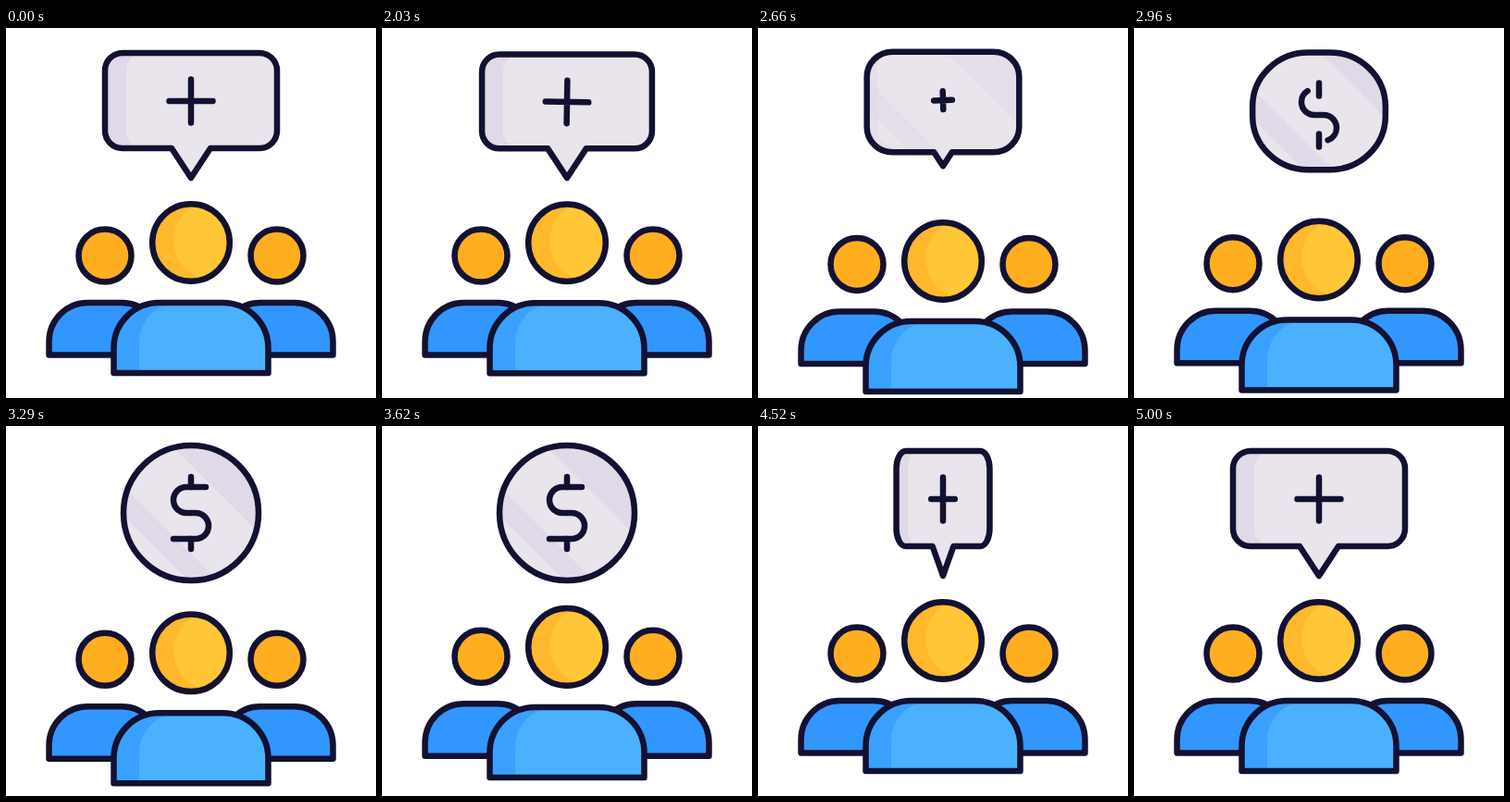
An HTML page that plays this animation: 400 by 400 pixels, repeating every 5.03 s.

```html
<!DOCTYPE html>
<html lang="en">
<head>
<meta charset="utf-8">
<title>Group funding</title>
<style>
  html, body { margin: 0; width: 100%; height: 100%; overflow: hidden; background: #fff; }
  svg { display: block; width: 100vw; height: 100vh; }
  .line { fill: none; stroke: #121131; stroke-width: 6.5; stroke-linecap: round; stroke-linejoin: round; vector-effect: non-scaling-stroke; }
</style>
</head>
<body>
<svg viewBox="0 0 400 400">
  <defs>
    <clipPath id="panelClip"><path id="panelMask"/></clipPath>
    <clipPath id="headClip"><circle cx="200" cy="232" r="42"/></clipPath>
    <path id="torso" d="M116.5 373V346a49 49 0 0 1 49-49H234.500a49 49 0 0 1 49 49V373Z"/>
    <clipPath id="torsoClip"><use href="#torso"/></clipPath>
    <g id="friend">
      <circle class="line" cx="107" cy="246" r="28.500" style="fill:#ffae20"/>
      <path class="line" d="M46.500 353.500V339a42 42 0 0 1 42-42H125a42 42 0 0 1 42 42V353.500Z" style="fill:#3296ff"/>
    </g>
  </defs>

  <g id="sides">
    <use href="#friend"/>
    <use href="#friend" transform="matrix(-1 0 0 1 400 0)"/>
  </g>

  <g id="leader">
    <g clip-path="url(#headClip)">
      <circle cx="200" cy="232" r="42" fill="#ffb82b"/>
      <circle cx="223" cy="230" r="42" fill="#ffc637"/>
    </g>
    <circle class="line" cx="200" cy="232" r="41.800"/>
    <g clip-path="url(#torsoClip)">
      <use href="#torso" fill="#3aa0ff"/>
      <path d="M144 373V340a43 43 0 0 1 43-43H290V373Z" fill="#4bb0fd"/>
    </g>
    <use href="#torso" class="line"/>
  </g>

  <g id="panel">
    <g clip-path="url(#panelClip)">
      <rect width="400" height="200" fill="#eae5ec"/>
      <g id="bubbleShade">
        <path d="M100 20H149V27a19 19 0 0 0-19 19V111a19 19 0 0 0 19 19V134H100Z" fill="#e0d9e7"/>
      </g>
      <g id="coinShade" fill="#e0d9e7">
        <path d="M30 0H62L262 200H230Z"/>
        <path id="glint" d="M155 0H400V245Z"/>
      </g>
    </g>
    <path id="outline" class="line"/>
    <path id="plus" class="line" d="M176.500 79H223.500M200 55.500V102.500"/>
    <g id="dollar">
      <path id="curve" class="line" pathLength="2" d="M216 66H195a14 14 0 0 0 0 28H205a14 14 0 0 1 0 28H181"/>
      <path id="bars" class="line"/>
    </g>
  </g>
</svg>
<script>
const LOOP = 5030, START = 2030, STEP = 30, SWAP = 4240;
const $ = id => document.getElementById(id);
const set = (id, name, value) => $(id).setAttribute(name, value);

// Eased value from alternating times and values
function track(t, ...keys) {
  if (t <= keys[0]) return keys[1];
  for (let i = 2; i < keys.length; i += 2) {
    if (t < keys[i]) {
      const p = (t - keys[i - 2]) / (keys[i] - keys[i - 2]);
      return keys[i - 1] + (keys[i + 1] - keys[i - 1]) * p * p * (3 - 2 * p);
    }
  }
  return keys[keys.length - 1];
}

const about = (x, y, sx, sy = sx) => `translate(${x} ${y}) scale(${sx} ${sy}) translate(${-x} ${-y})`;
const show = (id, amount) => set(id, 'opacity', amount);

function panelPath(t, flip) {
  const halfWidth = track(t, 2560, 93, 2760, 70, 3000, 72, 3250, 73);
  const top = track(t, 2900, 27, 3250, 21, 3850, 21, SWAP, 27);
  const bottom = track(t, 2560, 130, 2900, 152, 3250, 167, 3850, 167, SWAP, 162);
  const tail = track(t, 2560, 1, 2750, 0);
  const w = halfWidth * flip;
  const rx = Math.min(track(t, 2560, 19, 2900, 59, 3250, 73), halfWidth) * flip;
  const ry = Math.min(track(t, 2560, 19, 2900, 57, 3250, 73), (bottom - top) / 2);
  const foot = 21 * tail * flip;
  const arc = (x, y) => `A${rx} ${ry} 0 0 1 ${x} ${y}`;
  return `M${200 - w + rx} ${top}H${200 + w - rx}${arc(200 + w, top + ry)}V${bottom - ry}` +
    `${arc(200 + w - rx, bottom)}H${200 + foot}L200 ${bottom + 32 * tail}L${200 - foot} ${bottom}` +
    `H${200 - w + rx}${arc(200 - w, bottom - ry)}V${top + ry}${arc(200 - w + rx, top)}Z`;
}

function draw(time) {
  const t = time < START ? 0 : START + Math.floor((time - START) / STEP) * STEP;
  const form = t < SWAP ? t : 0;

  const sink = track(t, 2000, 0, 2470, 20, 2700, 20, 4220, 0);
  set('leader', 'transform', `translate(0 ${sink})`);
  set('sides', 'transform', `translate(0 ${sink * 0.47})`);

  const flip = Math.max(0.01, track(t, 3850, 1, SWAP, 0, 4770, 1));
  const pulse = track(t, 2000, 1, 2150, 0.89, 2540, 1.065, 2700, 1);
  const flipped = about(200, 0, flip, 1);
  const shape = panelPath(form, flip);
  set('panel', 'transform', about(200, 162, pulse));
  set('panelMask', 'd', shape);
  set('outline', 'd', shape);

  const coin = track(form, 2560, 0, 2760, 1);
  show('bubbleShade', 1 - coin);
  show('coinShade', coin);
  set('bubbleShade', 'transform', flipped);
  set('coinShade', 'transform', flipped);
  set('glint', 'transform', `translate(${track(form, 2900, 20, 3400, 0)} 0)`);

  const size = track(form, 2560, 1, 2740, 0);
  const turn = track(form, 2000, 0, 2700, 180);
  show('plus', size > 0.02 ? 1 : 0);
  set('plus', 'transform', `${flipped} ${about(200, 79, Math.max(size, 0.01))} rotate(${turn} 200 79)`);

  const drawn = track(form, 2700, 0, 3160, 1);
  const spread = track(form, 2900, 0, 3250, 1);
  const outer = 34 + 5 * spread;
  const inner = outer - track(form, 2700, 0, 2900, 14, 3250, 11);
  show('dollar', drawn > 0 ? 1 : 0);
  set('dollar', 'transform', flipped);
  set('curve', 'stroke-dasharray', drawn < 1 ? `${2 * drawn} 4` : 'none');
  set('curve', 'stroke-dashoffset', drawn - 1);
  set('bars', 'd', `M200 ${94 - outer}V${94 - inner}M200 ${94 + inner}V${94 + outer}`);
}

const begin = performance.now();
function frame() {
  draw((performance.now() - begin) % LOOP);
  requestAnimationFrame(frame);
}
frame();
</script>
</body>
</html>
```
